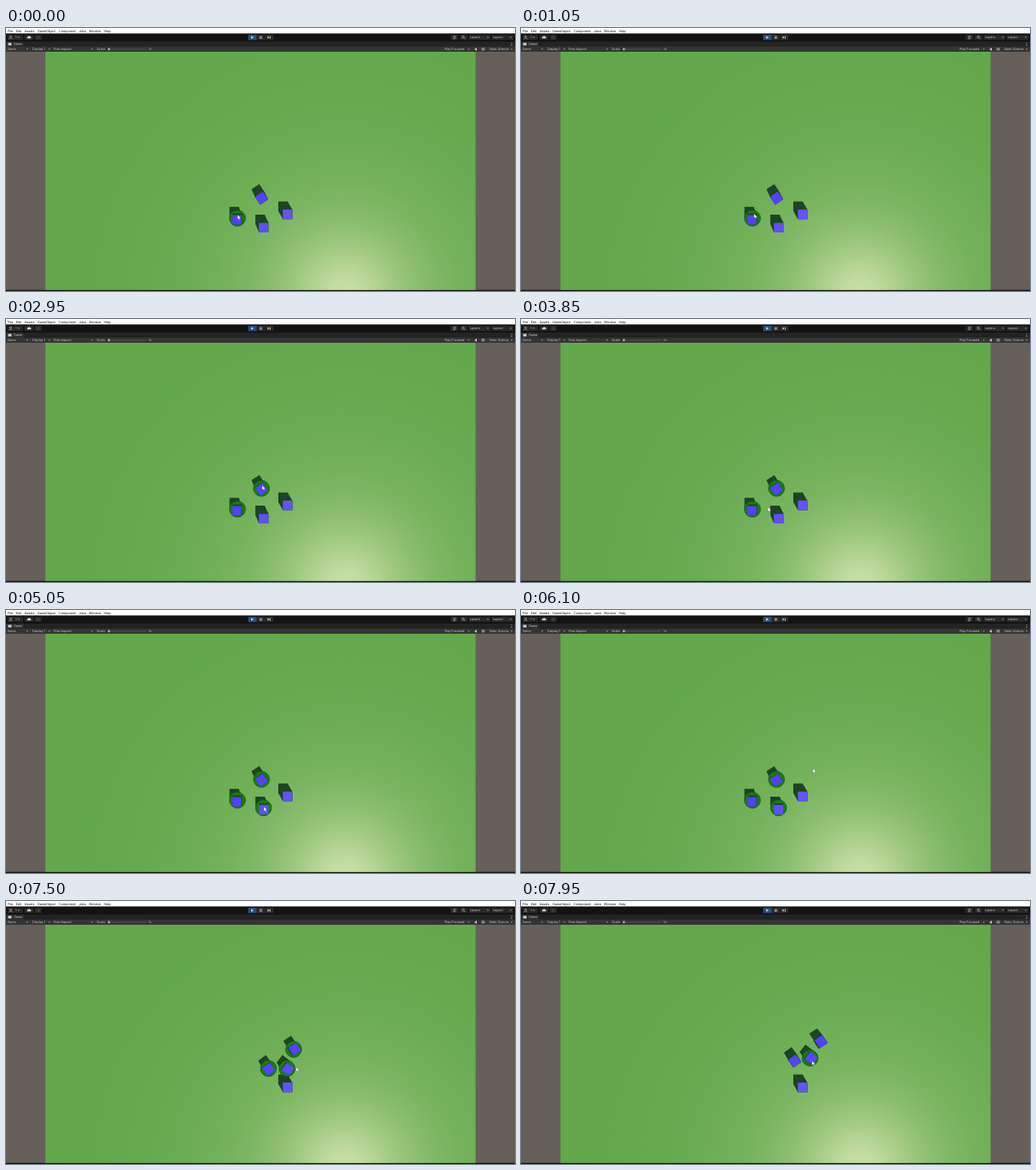
These frames come from a looping animation (600 by 310 pixels, 8 s). An HTML page:

```html
<!DOCTYPE html>
<html lang="en">
<head>
<meta charset="utf-8">
<style>
  html, body { margin: 0; width: 100%; height: 100%; overflow: hidden; background: #191919; }
  svg { display: block; width: 600px; height: 310px; }
  text { font: 3.7px Inter, Roboto, sans-serif; fill: #c8c8c8; text-rendering: geometricPrecision; }
  .menu { fill: #111; }
</style>
</head>
<body>
<svg viewBox="0 0 600 310">
  <defs>
    <radialGradient id="glow" gradientUnits="userSpaceOnUse" cx="400" cy="316" r="320"></radialGradient>
    <clipPath id="view"><rect x="46.5" y="28" width="507" height="280.7"/></clipPath>
  </defs>
  <rect width="600" height="310" fill="#131313"/>
  <rect width="600" height="6.4" fill="#fdfdfd"/>
  <rect y="16" width="600" height="6" fill="#232323"/>
  <rect y="16" width="21" height="6" fill="#2e2e2e"/>
  <rect y="22" width="600" height="6" fill="#343434"/>
  <rect y="28" width="600" height="280.7" fill="#665f5a"/>
  <g clip-path="url(#view)">
    <rect y="28" width="600" height="281" fill="#62a84b"/>
    <rect y="28" width="600" height="281" fill="url(#glow)"/>
    <g id="shadows" fill="#1d4423"></g>
    <g id="rings" fill="#16800f" stroke="#1d5c17" stroke-width="0.9"></g>
    <g id="bodies"></g>
  </g>

  <g fill="#292929">
    <path d="M2 8.2h18v5.8h-18zM22 8.2h10.5v5.8h-10.5zM34 8.2h8v5.8h-8z"/>
    <path d="M524 8.2h9v5.8h-9zM535 8.2h9v5.8h-9zM545.5 8.2h25.5v5.8h-25.5zM572.5 8.2h25.5v5.8h-25.5z"/>
    <path d="M295.8 8h9.3v6.2h-9.3zM305.4 8h9.8v6.2h-9.8z"/>
    <path d="M285.5 8h10v6.2h-10z" fill="#28507f"/>
  </g>
  <text class="menu" id="menu" x="2" y="4.5"></text>
  <text x="11" y="12.4">1</text>
  <text x="547" y="12.4">Layers</text>
  <text x="574" y="12.4">Layout</text>
  <text x="9" y="20.3">Game</text>
  <text y="26.3"><tspan x="1.5">Game</tspan><tspan x="31">Display 1</tspan><tspan x="56">Free Aspect</tspan><tspan x="107">Scale</tspan><tspan x="168">1x</tspan><tspan x="517">Play Focused</tspan><tspan x="569.5">Stats</tspan><tspan x="579.5">Gizmos</tspan></text>
  <g fill="#d0d0d0">
    <path d="M14 10.5h2l-1 1.2zM567 10.5h2l-1 1.2zM594 10.5h2l-1 1.2z"/>
    <path d="M24 24.5h2l-1 1.2zM50 24.5h2l-1 1.2zM100.5 24.5h2l-1 1.2zM544.5 24.5h2l-1 1.2zM595 24.5h2l-1 1.2z"/>
    <path d="M289 9.4l3.2 1.7-3.2 1.7z"/>
    <path d="M299 9.5h.9v3.2h-.9zM300.8 9.5h.9v3.2h-.9zM308.4 9.5l2.4 1.6-2.4 1.6zM311 9.5h.8v3.2h-.8z"/>
    <path d="M2.5 17.5h4v3h-4zM552.5 24.2h1l1.4-1.2v4l-1.4-1.2h-1z"/>
    <path d="M25.3 12.3h3.4a1 1 0 0 0 0-2q-1.6-2-2.6 0a1 1 0 0 0-.8 2"/>
    <path d="M560.5 23.3h4v3.2h-4z" fill="#858585"/>
    <path d="M595.6 17.3h.8v.8h-.8zM595.6 18.7h.8v.8h-.8zM595.6 20.1h.8v.8h-.8z"/>
  </g>
  <g fill="none" stroke="#c4c4c4" stroke-width="0.6">
    <circle cx="5.5" cy="10.3" r="1"/>
    <path d="M3.6 13q1.9-2.6 3.8 0M527 9.7h3.5M527 11.2h3.5M527 12.7h2.5"/>
    <circle cx="38" cy="11" r="1.4" stroke="#5a5a5a"/>
    <circle cx="539" cy="10.6" r="1.3"/><path d="M540 11.6l1.4 1.4"/>
  </g>
  <rect x="120" y="24.7" width="45" height="0.6" fill="#656565"/>
  <circle cx="121.3" cy="25" r="1.4" fill="#aaa"/>
  <path id="cursor" d="M0 0v5l1.2-1 1 1.8.9-.4-.9-1.8h1.6z" fill="#fff" stroke="#444" stroke-width="0.3"/>
</svg>
<script>
const LOOP = 8000;
const MARCH = 6200;    // ms, when the selected units set off
const SPEED = 0.036;   // px per ms
const SIDE = 11.1;
const $ = id => document.getElementById(id);
const mix = (a, b, k) => a + (b - a) * k;
const smooth = k => k * k * (3 - 2 * k);

function add(parent, tag, attrs = {}) {
  const el = document.createElementNS("http://www.w3.org/2000/svg", tag);
  for (const k in attrs) el.setAttribute(k, attrs[k]);
  return parent.appendChild(el);
}

"File Edit Assets GameObject Component Jobs Window Help".split(" ").forEach((name, i) => {
  add($("menu"), "tspan", { dx: i ? 3.5 : 0 }).textContent = name;
});

// Specular falloff of the light on the ground
for (let k = 0; k <= 1; k += 1 / 16) {
  const alpha = (1 - k * k) / (1 + (k * 320 / 75) ** 2);
  add($("glow"), "stop", { offset: k, "stop-color": "#cadfa6", "stop-opacity": alpha.toFixed(3) });
}

const units = [
  { x: 272, y: 226, heading: -36.5, on: 0, off: 7750 },
  { x: 301.2, y: 200.5, heading: -33.5, turned: true, on: 2200, off: 7750 },
  { x: 303.7, y: 235.4, heading: -52.5, on: 4650, off: LOOP },
  { x: 331.9, y: 219.6, heading: 0, on: LOOP, off: LOOP }
];
for (const u of units) {
  u.shadow = add($("shadows"), "path");
  u.ring = add($("rings"), "circle", { r: 9.4 });
  u.wall = add($("bodies"), "path", { fill: "#1d4423" });
  u.top = add($("bodies"), "path");
}

// Pointer stops: time, x, y
const stops = [
  [900, 273, 220.5], [1950, 303, 195], [2900, 302, 196], [3850, 291, 222], [4500, 303, 232],
  [5150, 304, 232], [5900, 344, 187], [6250, 344, 187], [6800, 361, 160], [7500, 342, 196], [7800, 343, 188.5]
];

function pointerAt(t) {
  const i = stops.findIndex(s => s[0] > t);
  if (i === 0) return stops[0].slice(1);
  if (i < 0) return stops[stops.length - 1].slice(1);
  const [t0, x0, y0] = stops[i - 1], [t1, x1, y1] = stops[i];
  const k = smooth((t - t0) / (t1 - t0));
  return [mix(x0, x1, k), mix(y0, y1, k)];
}

const radians = deg => deg * Math.PI / 180;
const poly = pts => "M" + pts.map(p => p.map(v => v.toFixed(2)).join(" ")).join("L") + "Z";

function square(x, y, deg) {
  return [0, 1, 2, 3].map(i => {
    const a = radians(45 + i * 90 + deg), r = SIDE / Math.SQRT2;
    return [x + r * Math.cos(a), y + r * Math.sin(a)];
  });
}

// A square swept along (dx, dy), every part wound the same way
function sweep(pts, dx, dy) {
  const far = pts.map(([x, y]) => [x + dx, y + dy]);
  return poly(far) + pts.map((p, i) => {
    const j = (i + 1) % 4;
    const quad = [p, pts[j], far[j], far[i]];
    const cross = (pts[j][0] - p[0]) * dy - (pts[j][1] - p[1]) * dx;
    return poly(cross < 0 ? quad.reverse() : quad);
  }).join("");
}

function drawUnit(u, t) {
  const moving = t > MARCH && u.on < MARCH;
  const gone = moving ? (t - MARCH) * SPEED : 0;
  const x = u.x + gone * Math.cos(radians(u.heading));
  const y = u.y + gone * Math.sin(radians(u.heading));
  const pts = square(x, y, moving || u.turned ? u.heading : 0);
  // The base lies nearer the camera centre than the top
  const bx = (300 - x) * 0.03, by = (180 - y) * 0.04;
  const lit = Math.min(1, Math.max(0, (155 - Math.hypot(x - 400, y - 316)) / 40));

  u.shadow.setAttribute("d", sweep(pts, -3 - (x - 272) * 0.04, -8 - (y - 170) * 0.03));
  u.wall.setAttribute("d", sweep(pts, bx, by));
  u.top.setAttribute("d", poly(pts));
  u.top.setAttribute("fill", `rgb(${mix(82, 100, lit)} ${mix(65, 84, lit)} ${mix(246, 254, lit)})`);
  u.ring.setAttribute("cx", x + bx);
  u.ring.setAttribute("cy", y + by);
  u.ring.style.display = t >= u.on && t < u.off ? "" : "none";
}

function render(t) {
  for (const u of units) drawUnit(u, t);
  $("cursor").setAttribute("transform", `translate(${pointerAt(t).map(v => v.toFixed(2))})`);
}

const start = performance.now();
function tick() {
  render((performance.now() - start) % LOOP);
  requestAnimationFrame(tick);
}
render(0);
requestAnimationFrame(tick);
</script>
</body>
</html>
```
